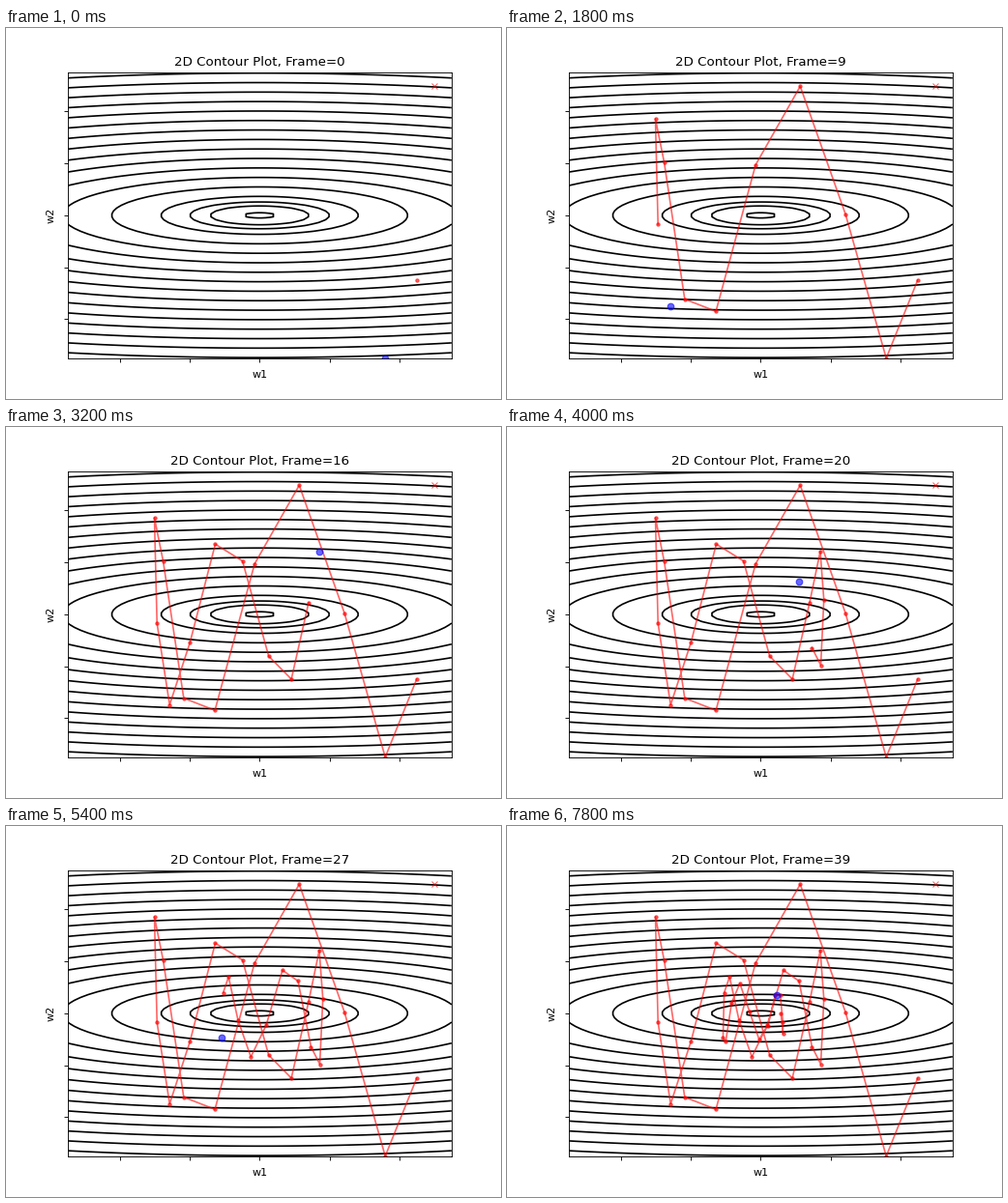
Animation, 512 px wide and 384 px high, one loop 8000 ms. Source, as a matplotlib script:

```python
import numpy as np
import matplotlib.pyplot as plt
from matplotlib.animation import FuncAnimation

FRAMES = 40
RATE, MOMENTUM = 0.1, 0.9
START = np.array([5.0, 5.0])
CURVATURE = np.array([1.0, 15.0])
LIMIT = 5.5


def descend(steps):
    """Gradient descent with heavy-ball momentum on a quadratic bowl."""
    w, v = START, np.zeros(2)
    path = [w]
    for _ in range(steps):
        v = MOMENTUM * v - RATE * CURVATURE * w
        w = w + v
        path.append(w)
    return np.array(path)


path = descend(FRAMES + 1)

fig, ax = plt.subplots(figsize=(6.4, 4.8), dpi=80)
grid = np.linspace(-LIMIT, LIMIT, 100)
w1, w2 = np.meshgrid(grid, grid)
loss = 0.5 * (CURVATURE[0] * w1**2 + CURVATURE[1] * w2**2)
levels = [0.1, 1, 2] + [k * k for k in range(2, 17)]
ax.contour(w1, w2, loss, levels=levels, colors="black")

ax.set_xlim(-LIMIT, LIMIT)
ax.set_ylim(-LIMIT, LIMIT)
ticks = np.arange(-4, 5, 2)
ax.set_xticks(ticks)
ax.set_yticks(ticks)
ax.set_xticklabels([])
ax.set_yticklabels([])
ax.set_xlabel("w1")
ax.set_ylabel("w2")
title = ax.set_title("")

ax.plot(*START, "rx", alpha=0.6)
trail, = ax.plot([], [], "r.-", alpha=0.6)
head, = ax.plot([], [], "bo", alpha=0.6)


def update(i):
    trail.set_data(path[1:i + 2].T)
    head.set_data(path[i + 2:i + 3].T if i + 2 < len(path) else path[-1:].T)
    title.set_text(f"2D Contour Plot, Frame={i}")
    return trail, head, title


anim = FuncAnimation(fig, update, frames=FRAMES, interval=200, repeat=True)
plt.show()
```
